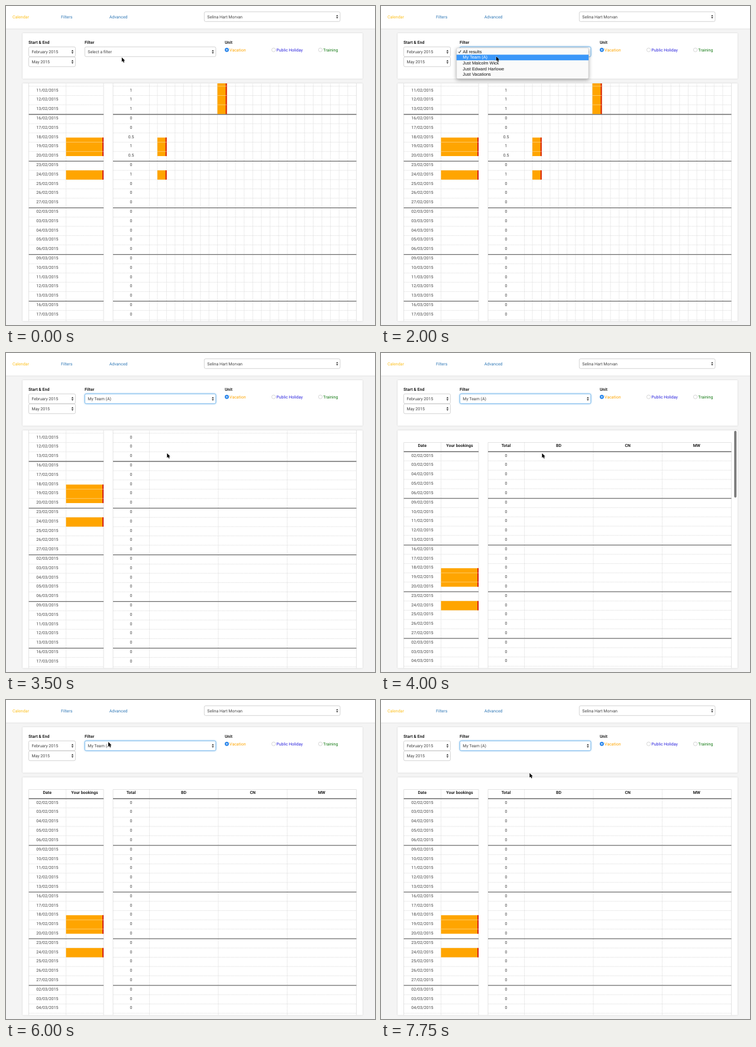
Recreate the animation shown at these times as an HTML page. Size 624 by 540 pixels, loop 8 s.

```html
<!DOCTYPE html>
<html lang="en">
<head>
<meta charset="utf-8">
<title>Booking calendar</title>
<style>
  html, body { margin: 0; width: 100%; height: 100%; overflow: hidden; background: #f4f4f4; }
  svg { display: block; }
  text { font: 7px Roboto, sans-serif; fill: #444; text-rendering: geometricPrecision; white-space: pre; }
  .b { font-weight: 700; fill: #222; }
  .m { text-anchor: middle; }
  .menu text { font: 7.4px "Liberation Sans", Arial, sans-serif; fill: #111; }
  .card { fill: #fff; filter: drop-shadow(0 .5px 1px rgba(0, 0, 0, .16)); }
  .field { fill: #fff; stroke: #c8c8c8; stroke-width: .8; }
  .dash { stroke: #d9d9d9; stroke-width: .75; stroke-dasharray: 1.5 .8; }
  .edge { stroke: #dcdcdc; stroke-width: .8; }
  .week { stroke: #6a6a6a; stroke-width: 1.3; }
</style>
</head>
<body>
<script>
const LOOP = 8000, STEP = 250;
const TOP = 167, ROW = 15.68, WEEK = 79.05, WEEKS = 8, END = 592.5;

function el(parent, tag, attrs = {}, text) {
  const node = document.createElementNS('http://www.w3.org/2000/svg', tag);
  for (const k in attrs) node.setAttribute(k, attrs[k]);
  if (text !== undefined) node.textContent = text;
  parent.append(node);
  return node;
}
const group = (p, attrs) => el(p, 'g', attrs);
const rect = (p, x, y, width, height, attrs) => el(p, 'rect', { x, y, width, height, ...attrs });
const line = (p, x1, y1, x2, y2, cls) => el(p, 'line', { x1, y1, x2, y2, class: cls });
// y is the middle of the capitals
const label = (p, x, y, text, cls = '', fill) =>
  el(p, 'text', { x, y: y + 2.5, class: cls, ...(fill && { style: `fill:${fill}` }) }, text);

function select(p, x, y, w, text) {
  const box = rect(p, x, y, w, 16.5, { rx: 2.3, class: 'field' });
  const cy = y + 8.25, ax = x + w - 5;
  el(p, 'path', {
    d: `M${ax - 1.8} ${cy - .7}h3.6l-1.8 -2.4zM${ax - 1.8} ${cy + .8}h3.6l-1.8 2.4z`,
    fill: '#333'
  });
  return { box, text: label(p, x + 5, cy, text) };
}

function radio(p, x, text, color, on) {
  el(p, 'circle', {
    cx: x, cy: 74.3, r: 3.2, fill: on ? '#2f8cf0' : '#fff',
    stroke: on ? '#2a7de0' : '#c4c4c4', 'stroke-width': .7
  });
  if (on) el(p, 'circle', { cx: x, cy: 74.3, r: 1.1, fill: '#fff' });
  label(p, x + 4.7, 74.1, text, '', color);
}

const rowY = i => TOP + Math.floor(i / 5) * WEEK + (i % 5) * ROW;

function grid(p, columns) {
  const x0 = columns[0], x1 = columns[columns.length - 1], bottom = TOP + WEEKS * WEEK;
  line(p, x0, 151.5, x1, 151.5, 'edge');
  columns.forEach((x, i) =>
    line(p, x, 151.5, x, bottom, i && i < columns.length - 1 ? 'dash' : 'edge'));
  for (let i = 0; i < WEEKS * 5; i++) {
    if (i % 5) line(p, x0, rowY(i), x1, rowY(i), 'dash');
    else line(p, x0, rowY(i), x1, rowY(i), 'week');
  }
}

// Rows may be fractional: .5 is half a day
function booking(p, x, w, from, to) {
  const at = r => rowY(Math.floor(r)) + (r % 1) * ROW;
  const y = at(from), h = at(to) - y;
  rect(p, x, y, w, h, { fill: '#ffa500' });
  rect(p, x + w - 2, y, 2, h, { fill: '#d8200c' });
  for (let r = Math.ceil(from); r < to; r++)
    if (r > from) rect(p, x, rowY(r) - .4, w, .8, { fill: '#fff', opacity: .5 });
}

const svg = el(document.body, 'svg', { width: 624, height: 540, viewBox: '0 0 624 540' });
rect(svg, 0, 0, 624, 540, { fill: '#f4f4f4' });
rect(svg, -4, -4, 632, 42.3, { class: 'card' });
label(svg, 11, 18, 'Calendar', '', '#fcbf1c');
label(svg, 93, 18, 'Filters', '', '#337ab7');
label(svg, 174.7, 18, 'Advanced', '', '#337ab7');
select(svg, 335.3, 9.8, 229.7, 'Selina Hart Morvan');

rect(svg, 28, 46, 575, 77, { rx: 1, class: 'card' });
label(svg, 38, 61.5, 'Start & End', 'b');
label(svg, 133, 61.5, 'Filter', 'b');
label(svg, 370, 61.5, 'Unit', 'b');
select(svg, 38.4, 69.2, 79, 'February 2015');
select(svg, 38.4, 86.2, 79, 'May 2015');
const filter = select(svg, 133.3, 69.2, 221.5, 'Select a filter');
radio(svg, 373.4, 'Vacation', '#ffa500', true);
radio(svg, 452.6, 'Public Holiday', '#2a22dd');
radio(svg, 531.6, 'Training', '#147a14');

rect(svg, 28, 131, 575, 402.5, { rx: 1, class: 'card' });
rect(el(svg, 'clipPath', { id: 'view' }), 28, 131, 575, 402.5);
const view = group(svg, { 'clip-path': 'url(#view)' });
const sheet = group(view);

// Left table: dates and own bookings
grid(sheet, [38.5, 101.5, 165]);
label(sheet, 69.8, 156.7, 'Date', 'b m');
label(sheet, 133, 156.7, 'Your bookings', 'b m');
booking(sheet, 101.5, 63.5, 12.5, 14.5);
booking(sheet, 101.5, 63.5, 16, 17 - .001);

const pad = n => String(n).padStart(2, '0');
for (let i = 0; i < WEEKS * 5; i++) {
  const d = new Date(Date.UTC(2015, 1, 2 + Math.floor(i / 5) * 7 + i % 5));
  label(sheet, 69.9, rowY(i) + 6.3,
    `${pad(d.getUTCDate())}/${pad(d.getUTCMonth() + 1)}/${d.getUTCFullYear()}`, 'm');
}

// Right table, with everyone or with the team only
function totals(columns, counts) {
  const g = group(sheet);
  grid(g, [181, ...columns]);
  label(g, 211.5, 156.7, 'Total', 'b m');
  for (let i = 0; i < WEEKS * 5; i++) label(g, 211.5, rowY(i) + 6.3, counts[i] || 0, 'm');
  return g;
}
const span = (a, b, n) => Array.from({ length: n }, (_, i) => a + (b - a) * i / n);
const everyone = totals(
  [242.5, 256, ...span(271.5, 357.5, 6), 357.5, ...span(373.5, END, 15), END],
  { 7: 1, 8: 1, 9: 1, 12: .5, 13: 1, 14: .5, 16: 1 });
booking(everyone, 357.5, 16, 7 - .5, 9.999);
booking(everyone, 256, 15.7, 12.5, 14.5);
booking(everyone, 256, 15.7, 16, 16.999);

const team = totals([242.5, 359, 475.5, END], {});
['BD', 'CN', 'MW'].forEach((s, i) => label(team, 300.6 + i * 116.6, 156.7, s, 'b m'));

const thumb = rect(view, 597.2, 131.8, 4, 113, { rx: 2, fill: '#7c7c7c' });

// Filter menu
const menu = group(svg, { class: 'menu' });
rect(menu, 127.7, 71, 223.3, 52, {
  rx: 2, fill: '#fafafa', stroke: '#c9c9c9', 'stroke-width': .6,
  style: 'filter:drop-shadow(0 2px 3px rgba(0,0,0,.35))'
});
rect(menu, 127.7, 82.4, 223.3, 9.5, { fill: '#3a97f9' });
['All results', 'My Team (A)', 'Just Malcolm Wick', 'Just Edward Harlowe', 'Just Vacations']
  .forEach((s, i) => label(menu, 138.3, 77.4 + i * 9.58, s, '', i === 1 && '#fff'));
el(menu, 'path', { d: 'M131 77.6l1.5 2 2.6 -4.6', fill: 'none', stroke: '#222', 'stroke-width': 1 });

const pointer = el(svg, 'path', {
  d: 'M0 0V7.6L1.8 6L3 8.8L4.4 8.2L3.2 5.5H5.5Z',
  fill: '#000', stroke: '#fff', 'stroke-width': .7, 'paint-order': 'stroke'
});

// [time, x, y]
const path = [
  [0, 195.8, 87], [500, 195.8, 87], [1000, 194.8, 85.3], [3000, 194.8, 85.6],
  [3250, 240, 140], [3500, 272.3, 169.8], [5000, 272.3, 169.8], [5750, 180, 78],
  [6000, 173, 71], [7250, 176, 73], [7500, 200, 84], [7750, 251.3, 123.7]
];
// [time, offset]
const scroll = [[0, 141.6], [3500, 141.6], [3750, 45], [4000, 0]];
const fade = [[0, 0], [3500, 0], [3750, 1], [4500, 1], [4750, .4], [5000, 0]];

function sample(keys, t, c = 1) {
  const n = keys.findIndex(k => k[0] > t);
  if (n < 0) return keys[keys.length - 1][c];
  const a = keys[n - 1], b = keys[n];
  return a[c] + (b[c] - a[c]) * (t - a[0]) / (b[0] - a[0]);
}
const show = (node, on) => node.setAttribute('visibility', on ? 'visible' : 'hidden');

function draw(now) {
  const t = Math.floor(now % LOOP / STEP) * STEP;
  const focused = t >= 1500, picked = t >= 3250;
  const y = sample(scroll, t);
  sheet.setAttribute('transform', `translate(0 ${-y})`);
  thumb.setAttribute('y', 131.8 + y * .28);
  thumb.setAttribute('opacity', sample(fade, t));
  show(everyone, !picked);
  show(team, picked);
  show(menu, focused && !picked);
  filter.text.textContent = picked ? 'My Team (A)' : 'Select a filter';
  filter.box.style.stroke = focused ? '#66afe9' : '';
  filter.box.style.filter = focused ? 'drop-shadow(0 0 1.5px rgba(102,175,233,.8))' : '';
  pointer.setAttribute('transform', `translate(${sample(path, t)} ${sample(path, t, 2)})`);
}

const start = performance.now();
function tick() {
  draw(performance.now() - start);
  requestAnimationFrame(tick);
}
tick();
</script>
</body>
</html>
```
